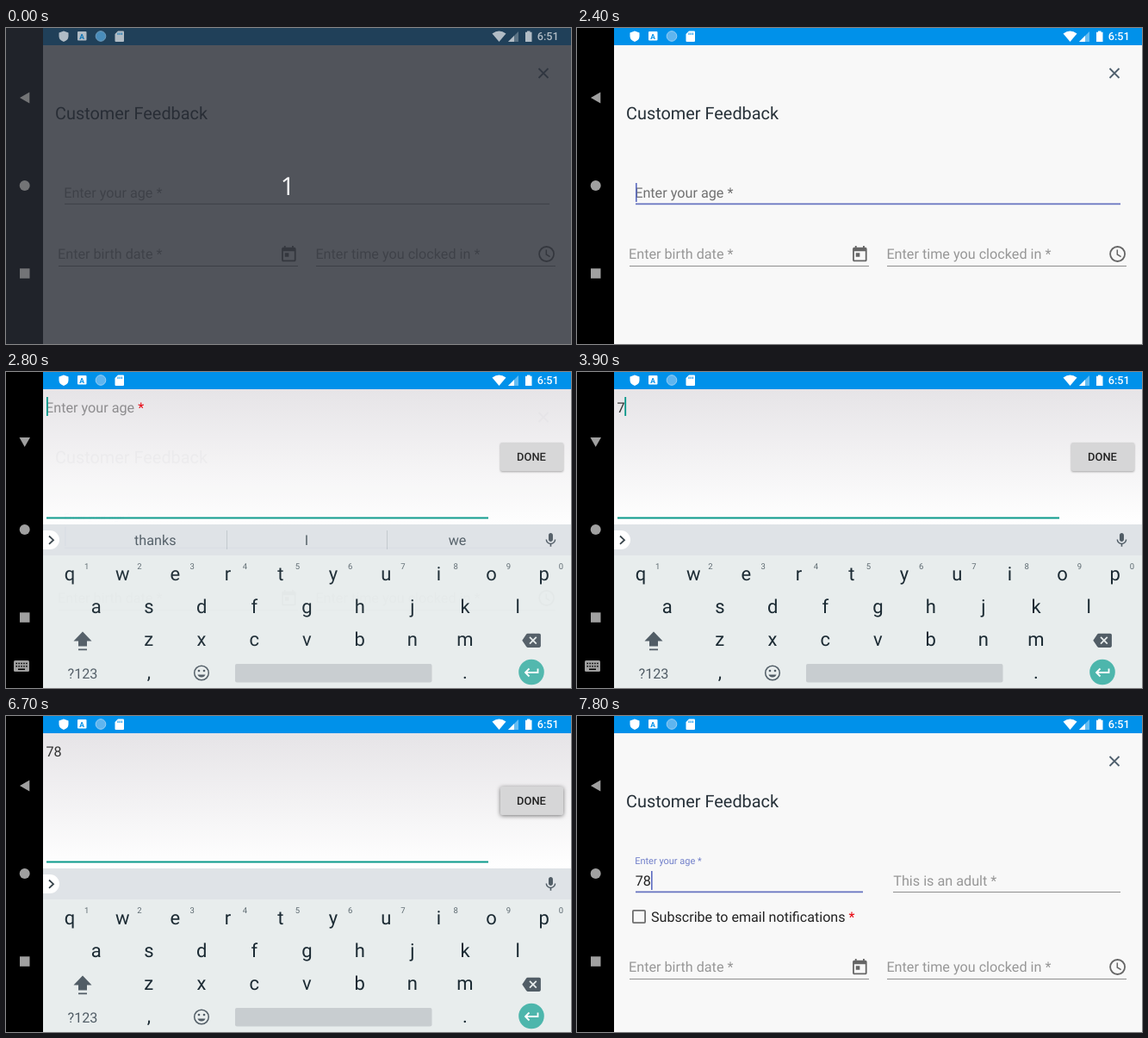
An HTML page for the animation above (8000 ms loop, 656 by 367 pixels).

```html
<!DOCTYPE html>
<html lang="en">
<head>
<meta charset="utf-8">
<title>Customer feedback form</title>
<style>
  html, body { margin: 0; width: 100%; height: 100%; overflow: hidden; background: #000; }
  svg { display: block; width: 656px; height: 367px; }
  text { font: 16.2px Roboto, sans-serif; text-rendering: geometricPrecision; white-space: pre; }
  .label { fill: #979797; }
  .star { fill: #e8000d; }
  .mid { text-anchor: middle; }
  .icon { fill: #666; }
  .line { stroke: #8e8e8e; stroke-width: 1; }
  .key { font-size: 22px; fill: #1b2a33; }
  .num { font-size: 9.5px; fill: #5d6a71; }
  .dim { fill: #515d66; }
  #done { filter: drop-shadow(0 1px 1px #0005); }
  #done.raised { filter: drop-shadow(0 1px 2.5px #0008); }
</style>
</head>
<body>
<svg viewBox="0 0 656 367">
  <rect width="656" height="367"/>
  <rect x="43" width="613" height="20" fill="#0091ea"/>
  <rect x="43" y="20" width="613" height="347" fill="#f8f8f8"/>

  <g id="form">
    <text x="57" y="106" style="font-size:19.9px" fill="#263038">Customer Feedback</text>
    <path d="M618.5 47l11 11m0-11l-11 11" stroke="#50606e" stroke-width="1.8"/>
    <text id="ageLabel" x="67.2" y="196.5">Enter your age *</text>
    <text id="ageValue" x="67.7" y="197" fill="#222">78</text>
    <path id="ageLine"/>
    <rect id="caret" x="68" y="180" width="1.6" height="22" fill="#5c6bc0"/>
    <g id="extra">
      <text class="label" x="367.3" y="196.5">This is an adult *</text>
      <path class="line" d="M367 204.5H631"/>
      <rect x="64.9" y="225.9" width="14.2" height="14.2" rx="1" fill="none" stroke="#6f6f6f" stroke-width="1.8"/>
      <text x="86" y="239" style="font-size:16.1px" fill="#222">Subscribe to email notifications <tspan class="star">*</tspan></text>
    </g>
    <g id="lower">
      <text class="label" x="60" y="268">Enter birth date *</text>
      <text class="label" x="359.4" y="268">Enter time you clocked in *</text>
      <path class="line" d="M61 276.5H339M360 276.5H638"/>
      <path class="icon" transform="translate(317.3 252) scale(.92)" d="M19 3h-1V1h-2v2H8V1H6v2H5c-1.1 0-2 .9-2 2v14c0 1.1.9 2 2 2h14c1.1 0 2-.9 2-2V5c0-1.100-.9-2-2-2zm0 16H5V8h14zM7 10h5v5H7z"/>
      <g fill="none" stroke="#666" stroke-width="1.8">
        <circle cx="627.6" cy="262.5" r="8.500"/>
        <path d="M627.300 257.500V263l4.300 2.600" stroke-width="1.500"/>
      </g>
    </g>
  </g>

  <g id="ime">
    <linearGradient id="fade" x2="0" y2="1">
      <stop stop-color="#e6e4e7"/><stop offset="1" stop-color="#fff"/>
    </linearGradient>
    <rect x="43" y="20" width="613" height="157" fill="url(#fade)"/>
    <text id="hint" x="46" y="46.500" fill="#8b8a8c">Enter your age <tspan class="star">*</tspan></text>
    <text id="typed" x="46.500" y="46.500" fill="#333"></text>
    <rect id="imeCaret" y="29" width="1.800" height="22" fill="#009688"/>
    <rect x="47" y="168.500" width="513" height="2" fill="#0a9a8b"/>
    <rect id="done" x="574" y="82" width="73" height="33" rx="2" fill="#d6d6d7"/>
    <text class="mid" x="610" y="103" style="font-size:12.900px;font-weight:500" fill="#222">DONE</text>

    <rect x="43" y="177" width="613" height="190" fill="#e8eded"/>
    <rect x="43" y="177" width="613" height="36" fill="#dfe3e7"/>
    <path d="M43 184H51a11 11 0 0 1 0 22H43z" fill="#fff"/>
    <path d="M50 190.500l5 4.700l-5 4.700" fill="none" stroke="#37434a" stroke-width="1.800"/>
    <g id="words" class="dim mid">
      <text x="173.300" y="201">thanks</text><text x="349" y="201">I</text><text x="524" y="201">we</text>
      <path d="M256.500 184V206M442.500 184V206" stroke="#c3c9cd"/>
    </g>
    <path class="dim" transform="translate(622.500 185.300) scale(.83)" d="M12 14c1.700 0 3-1.300 3-3V5c0-1.700-1.300-3-3-3S9 3.300 9 5v6c0 1.700 1.300 3 3 3zm5.300-3c0 3-2.500 5.100-5.300 5.100S6.700 14 6.700 11H5c0 3.400 2.700 6.200 6 6.700V21h2v-3.300c3.300-.5 6-3.300 6-6.700z"/>
    <g id="keys" class="mid"></g>
    <g class="dim">
      <path d="M89 301.500L99.500 312.500H94V318.500H84V312.500H78.500zM84 321.500H94V323.300H84z"/>
      <path transform="translate(599.300 301) scale(.9)" d="M22 3H7c-.7 0-1.200.4-1.600.9L0 12l5.400 8.100c.4.500.9.900 1.600.900h15c1.100 0 2-.9 2-2V5c0-1.100-.9-2-2-2zm-3 12.600L17.600 17 14 13.400 10.400 17 9 15.600 12.600 12 9 8.400 10.400 7 14 10.600 17.600 7 19 8.400 15.400 12z"/>
      <text class="mid" x="89" y="355.500">?123</text>
      <circle cx="224" cy="347" r="1.300"/><circle cx="230" cy="347" r="1.300"/>
    </g>
    <circle cx="227" cy="349.500" r="8.300" fill="none" stroke="#515d66" stroke-width="1.500"/>
    <path d="M222.500 351.500a4.800 4.500 0 0 0 9 0z" fill="#515d66"/>
    <rect x="266" y="339" width="228.500" height="21.500" rx="2" fill="#c8cdd0"/>
    <circle cx="610" cy="348.500" r="14.800" fill="#4db6ac"/>
    <path d="M617.500 344.500V349H603m4.500-4.500L603 349l4.500 4.500" fill="none" stroke="#fff" stroke-width="1.800"/>
  </g>

  <g id="count">
    <rect width="656" height="367" fill="#282c35" opacity=".8"/>
    <text class="mid" x="327" y="194" style="font:29px 'Open Sans',sans-serif" fill="#fff">1</text>
  </g>

  <g id="system" fill="#fff">
    <path d="M67 3.500l5.500 2V9.500q0 4.500-5.500 6.500q-5.500-2-5.500-6.500V5.500z"/>
    <rect x="83" y="4" width="10.500" height="10.500" rx="1"/>
    <text class="mid" x="88.200" y="12.500" style="font-size:8.500px;font-weight:700;fill:#0091ea">A</text>
    <circle cx="110" cy="9.500" r="5.800" fill="#5fb5ef" stroke="#9bd0f5"/>
    <path d="M130 3.500H136q1 0 1 1V15q0 1-1 1H127.500q-1 0-1-1V7z"/>
    <path d="M130 5.500v2.500m2.200-2.500v2.500m2.200-2.500v2.500" stroke="#0091ea"/>
    <path d="M564.500 6.500q8-6 16 0L572.500 16z"/>
    <path d="M595 4V16H583z" opacity=".4"/>
    <path d="M590 9V16H583z"/>
    <path d="M605 3.500H608.500V4.700H610.500V16H603V4.700H605z"/>
    <text x="616.800" y="14.300" style="font-size:12.700px;font-weight:500">6:51</text>
    <g fill="#a0a0a0">
      <path id="back"/>
      <circle cx="21.700" cy="183" r="6"/>
      <rect x="16" y="279.300" width="11.500" height="11.500"/>
      <g id="kbIcon">
        <rect x="9" y="335" width="18" height="13" rx="1.500"/>
        <path d="M11.500 338.500H25M11.500 341.700H25" stroke="#000" stroke-width="1.500" stroke-dasharray="1.500 1.400"/>
        <path d="M14 345.300H22" stroke="#000" stroke-width="1.500"/>
      </g>
    </g>
  </g>
</svg>
<script>
const $ = id => document.getElementById(id);
const show = (id, on) => { $(id).style.display = on ? '' : 'none'; };
const set = (id, attrs) => { for (const k in attrs) $(id).setAttribute(k, attrs[k]); };

// Keyboard rows: letters, first centre, baseline
const STEP = 61.2;
let keys = '';
const key = (cls, x, y, s) => { keys += `<text class="${cls}" x="${x}" y="${y}">${s}</text>`; };
for (const [row, x0, y] of [['qwertyuiop', 74, 241.5], ['asdfghjkl', 104.7, 279.5], ['zxcvbnm', 165.8, 318]])
  [...row].forEach((c, i) => {
    key('key', x0 + i * STEP, y, c);
    if (row.length === 10) key('num', x0 + i * STEP + 19.7, 229, (i + 1) % 10);
  });
key('key', 166, 355.5, ',');
key('key', 533, 355.5, '.');
$('keys').innerHTML = keys;

const within = (t, ...spans) => spans.some(([a, b]) => t >= a && t < b);

function imeOpacity(t) {
  if (t < 2700 || t >= 6900) return 0;
  if (t < 2800) return 0.6;
  if (t < 2900) return 0.97;
  return t < 6800 ? 1 : 0.5;
}

function draw(t) {
  const focused = t >= 2400, floated = t >= 2500;
  const filled = t >= 6800, keyboard = within(t, [2700, 6700]);

  show('count', t < 100);
  set('system', { opacity: t < 100 ? 0.65 : 1 });
  set('back', { d: keyboard ? 'M15.500 76H28L21.700 87z' : 'M27.300 74.500V87.500L16 81z' });
  show('kbIcon', keyboard);

  set('ageLabel', { y: floated ? 171.5 : 196.5, fill: floated ? '#7280ca' : focused ? '#717171' : '#979797' });
  $('ageLabel').style.fontSize = floated ? '11px' : '';
  set('ageLine', {
    d: `M68 204.300H${filled ? 332 : 631}`,
    stroke: focused ? '#6673c0' : '#8e8e8e',
    'stroke-width': focused ? 1.8 : 1
  });
  show('ageValue', filled);
  show('extra', filled);
  set('lower', { transform: `translate(0 ${filled ? 29 : 0})` });
  set('caret', { x: filled ? 86 : 68 });
  show('caret', focused && !within(t, [7300, 7800]));

  const typed = t < 3900 ? '' : t < 4800 ? '7' : '78';
  set('ime', { opacity: imeOpacity(t) });
  show('hint', !typed);
  show('words', !typed);
  $('typed').textContent = typed;
  set('imeCaret', { x: 47 + [0, 8.3, 17.4][typed.length] });
  show('imeCaret', !within(t, [3100, 3600], [4400, 4800], [5300, 5700], [6200, 6900]));
  $('done').classList.toggle('raised', t >= 6600);
}

function tick() {
  draw(performance.now() % 8000);
  requestAnimationFrame(tick);
}
tick();
</script>
</body>
</html>
```
